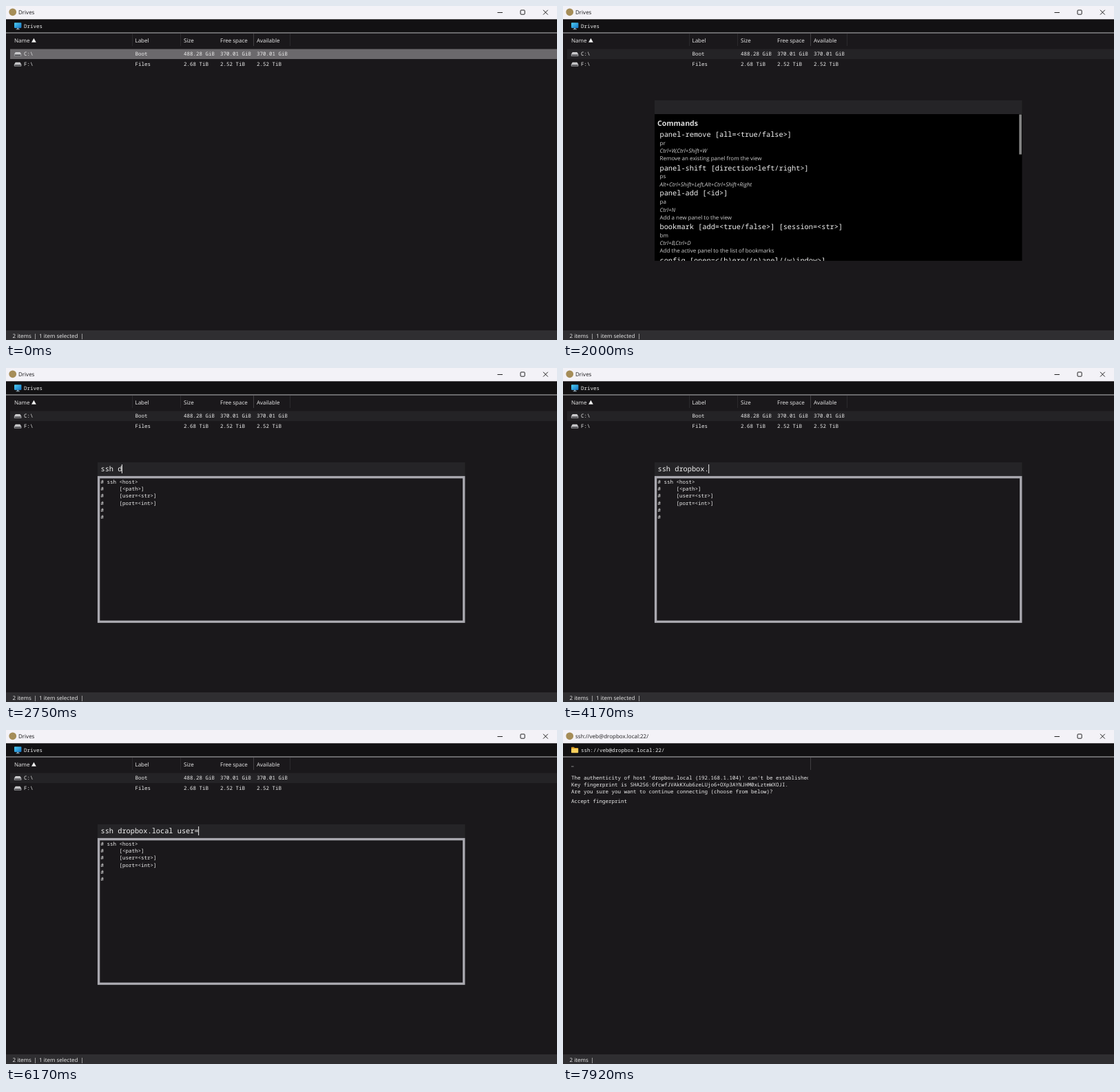
These frames come from a looping animation (800x485 px, 8 s). An HTML page:

```html
<!DOCTYPE html>
<html lang="en">
<head>
<meta charset="utf-8">
<title>Drives</title>
<style>
html, body { margin: 0; width: 100%; height: 100%; overflow: hidden; background: #1a181b; }
body > svg { display: block; width: 800px; height: 485px; }
text { white-space: pre; text-rendering: geometricPrecision; fill: #eee; }
.ui { font: 8px "Open Sans", "Noto Sans", sans-serif; }
.mono { font: 7.5px "Noto Sans Mono", "DejaVu Sans Mono", monospace; }
.big { font: 10.3px "Noto Sans Mono", "DejaVu Sans Mono", monospace; fill: #f4f4f4; }
.head { font: bold 10.5px "Open Sans", "Noto Sans", sans-serif; fill: #dcdcdc; }
.note { font: 8px "Open Sans", "Noto Sans", sans-serif; fill: #cfcfcf; }
.keys { font: italic 8px "Open Sans", "Noto Sans", sans-serif; fill: #cfcfcf; }
.dark { fill: #1c1b1e; }
</style>
</head>
<body>
<svg viewBox="0 0 800 485">
  <defs>
    <linearGradient id="screen" x2="1" y2="1"><stop stop-color="#4fd0f4"/><stop offset="1" stop-color="#1673c4"/></linearGradient>
    <clipPath id="list"><rect x="133" y="157" width="534" height="213"/></clipPath>
    <g id="drive">
      <path d="M13.8 0h6.6l2 3.2H11.8z" fill="#c9c9cb"/>
      <rect x="11.8" y="3" width="10.6" height="3" rx=".6" fill="#8e8e92"/>
      <path d="M13 4.6h8" stroke="#3a3a3d"/>
    </g>
  </defs>
  <rect width="800" height="485" fill="#1a181b"/>
  <rect width="800" height="19.5" fill="#f3f2f7"/>
  <circle cx="9.7" cy="8.8" r="5.4" fill="#a58d58"/>
  <path d="M713.5 9.5h7.5M780 5.8l6.8 6.8M786.8 5.8l-6.8 6.8" stroke="#222" fill="none"/>
  <rect x="747" y="6" width="6.2" height="6.2" rx="1" stroke="#222" fill="none"/>
  <rect y="19.5" width="800" height="18.5" fill="#121113"/>
  <rect y="38" width="800" height="2" fill="#69686b"/>
  <path d="M359.5 40v18" stroke="#403f42"/>
  <rect y="471" width="800" height="14" fill="#2f2e31"/>

  <g id="drives">
    <rect id="row" x="6" y="62.5" width="794" height="14.5"/>
    <rect x="12" y="24.3" width="10.4" height="7.6" rx=".8" fill="url(#screen)"/>
    <path d="M16 32h2.4v1.2h1.4v1h-5.2v-1h1.4z" fill="#8aa0ad"/>
    <path d="M183.5 40v18M253.5 40v18M412.5 40v18" stroke="#2b2a2d"/>
    <path d="M37 52.8l3.4-6 3.4 6z" fill="#eee"/>
    <use href="#drive" y="67"/>
    <use href="#drive" y="81.7"/>
  </g>

  <g id="remote">
    <path d="M12 25.6q0-.8.8-.8h3l1.2 1.2h4.4q.8 0 .8.8v1H12z" fill="#d99a21"/>
    <rect x="12" y="26.9" width="10.2" height="6.4" rx=".8" fill="#fbd05c"/>
  </g>

  <g id="popup">
    <rect x="133" y="137" width="533.5" height="20" fill="#252427"/>
    <rect x="133" y="157" width="533.5" height="213" fill="#000"/>
    <g id="commands" clip-path="url(#list)">
      <rect x="662.3" y="157.5" width="3.6" height="58" fill="#858585"/>
    </g>
    <g id="matches"></g>
    <g id="help">
      <rect x="134.6" y="158.6" width="530.2" height="209.8" fill="#1a181b" stroke="#a9a8af" stroke-width="3.4"/>
    </g>
    <text id="input" class="big" x="137.5" y="150"></text>
    <rect id="caret" y="140" width="1" height="13" fill="#e8e8e8"/>
  </g>
</svg>
<script>
const $ = id => document.getElementById(id);
const LOOP = 8000, OPEN = 1960, CONNECT = 6800, ADVANCE = 6.18;
const URL_TEXT = "ssh://veb@dropbox.local:22/";

function add(parent, tag, attrs) {
  const el = document.createElementNS("http://www.w3.org/2000/svg", tag);
  for (const name in attrs) el.setAttribute(name, attrs[name]);
  return parent.appendChild(el);
}

// A nested svg cuts the text off at the right edge, where one is given
function put(group, cls, x, y, text, right) {
  const parent = right ? add($(group), "svg", { width: right, height: 485 }) : $(group);
  add(parent, "text", { class: cls, x, y }).textContent = text;
}

function lines(group, cls, x, y, step, texts) {
  texts.forEach((text, i) => put(group, cls, x, y + i * step, text));
}

// Drive list
put("drives", "ui dark", 18, 12, "Drives");
put("drives", "mono", 26, 31.6, "Drives");
[[12, "Name"], [187.5, "Label"], [258, "Size"], [311, "Free space"], [364, "Available"]]
  .forEach(([x, label]) => put("drives", "ui", x, 53, label));
[["C:\\", "Boot", "488.28 GiB", "370.01 GiB", "370.01 GiB"],
 ["F:\\", "Files", "2.68 TiB", "2.52 TiB", "2.52 TiB"]].forEach((cells, r) =>
  cells.forEach((cell, c) => {
    const x = [26, 187.5, 258, 311, 364][c];
    put("drives", "mono", x, 72.2 + r * 14.7, cell, c > 1 && x + 44.6);
  }));
put("drives", "ui", 9.5, 482, "2 items");
put("drives", "ui", 40.5, 482, "|");
put("drives", "ui", 48, 482, "1 item selected");
put("drives", "ui", 108.5, 482, "|");

// Remote panel
put("remote", "ui dark", 18, 12, URL_TEXT);
put("remote", "mono", 26, 31.6, URL_TEXT);
put("remote", "ui", 12, 52, "_");
put("remote", "mono", 12, 72, "The authenticity of host 'dropbox.local (192.168.1.104)' can't be established.", 355.8);
put("remote", "mono", 12, 82, "Key fingerprint is SHA256:6fcwfJVAkKXub6zeLUjo6+OXp3AYNJHM0xLztmWXOJI.");
put("remote", "mono", 12, 92.2, "Are you sure you want to continue connecting (choose from below)?");
put("remote", "mono", 12, 105.6, "Accept fingerprint");
put("remote", "ui", 9.5, 482, "2 items");
put("remote", "ui", 40.5, 482, "|");

// Command list
put("commands", "head", 137, 173.7, "Commands");
let entryY = 190;
[["panel-remove [all=<true/false>]", "pr", "Ctrl+W,Ctrl+Shift+W", "Remove an existing panel from the view"],
 ["panel-shift [direction<left/right>]", "ps", "Alt+Ctrl+Shift+Left,Alt+Ctrl+Shift+Right"],
 ["panel-add [<id>]", "pa", "Ctrl+N", "Add a new panel to the view"],
 ["bookmark [add=<true/false>] [session=<str>]", "bm", "Ctrl+B,Ctrl+D", "Add the active panel to the list of bookmarks"],
 ["config [open=<(h)ere/(p)anel/(w)indow>]"]].forEach(entry => {
  entry.forEach((text, i) =>
    put("commands", ["big", "note", "keys", "note"][i], 140.5, entryY + (i && 0.5 + i * 11.3), text));
  entryY += entry.length > 3 ? 48.6 : 36.8;
});

// Matches for the typed command
put("matches", "head", 137, 173.7, "Panel History");
lines("matches", "big", 140.5, 190, 14.4, [
  URL_TEXT + "home/veb", URL_TEXT + "home", "ssh://veb@qbittorrent.local:22/", URL_TEXT, "C:\\Users\\Veb\\.ssh"]);
put("matches", "head", 137, 268.7, "Commands");
put("matches", "big", 140.5, 285, "ssh <host> [<path>] [user=<str>] [port=<int>]");
put("matches", "head", 137, 305.6, "Command History");
lines("matches", "big", 140.5, 322, 14.5, ["ssh dropbox.local user=veb", "ssh qbittorrent.local user=veb"]);

lines("help", "mono", 137.5, 168.2, 10.1,
  ["# ssh <host>", "#     [<path>]", "#     [user=<str>]", "#     [port=<int>]", "#", "#"]);

// Time of each key press
const COMMAND = "ssh dropbox.local user=veb";
const KEYS = [2170, 2330, 2420, 2580, 2750, 2920, 3000, 3170, 3330, 3830, 3920, 4160, 4500,
  4670, 4830, 4920, 5080, 5250, 5330, 5830, 5920, 6000, 6160, 6250, 6420, 6580];

const show = (id, on) => $(id).style.display = on ? "" : "none";

function draw(now) {
  const t = now % LOOP;
  const typed = KEYS.filter(k => k <= t).length;
  const popup = t >= OPEN && t < CONNECT;
  show("drives", t < CONNECT);
  show("remote", t >= CONNECT);
  show("popup", popup);
  show("commands", typed < 2);
  show("matches", typed > 1 && typed < 5);
  show("help", typed > 4);
  show("caret", t > 2060);
  $("row").setAttribute("fill", popup ? "#242326" : "#6b696c");
  $("input").textContent = COMMAND.slice(0, typed);
  $("caret").setAttribute("x", 137 + typed * ADVANCE);
  requestAnimationFrame(draw);
}
draw(performance.now());
</script>
</body>
</html>
```
